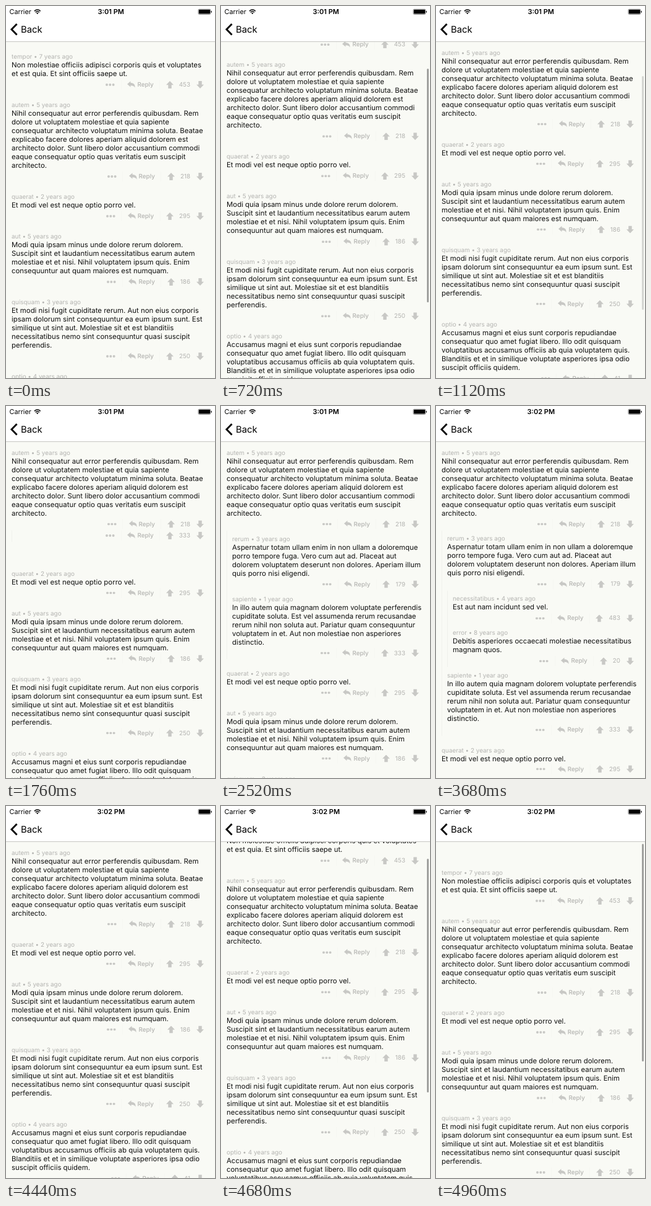
Write an HTML page that moves like this. It is 338 by 600 pixels and loops after 5000 ms.

```html
<!DOCTYPE html>
<html lang="la">
<head>
<meta charset="utf-8">
<title>Nested comments</title>
<style>
  html, body { margin: 0; width: 100%; height: 100%; overflow: hidden; background: #f9faf5; }
  body { position: relative; font: 11.42px/14px Inter, sans-serif; color: #111; text-rendering: geometricPrecision; }
  #list { position: absolute; top: 68px; left: 0; width: 338px; }
  #list > .node { padding-bottom: 9px; }
  .cell { position: relative; padding: 7px 0 0 9px; }
  .meta { height: 13px; font-size: 9.92px; color: #b4b4b1; }
  .text { white-space: pre; }
  .bar { height: 21px; margin-right: 18px; display: flex; align-items: center; justify-content: flex-end; font-size: 9.85px; color: #b4b4b1; }
  .bar svg { fill: #c8c8c5; }
  .bar b { font-weight: 500; margin-left: 3px; }
  .bar i { width: 1px; height: 16px; margin: 0 9.5px; background: #f5f6f1; }
  .bar span { margin: 0 10px 0 9px; }
  .kids { margin-left: 9px; overflow: hidden; }
  .inner { box-shadow: inset 1px 0 #f0f1ec; }
  #head { position: absolute; left: 0; top: 0; background: #fff; }
  #thumb { position: absolute; left: 333px; width: 2.5px; border-radius: 2px; background: #a0a09e; }
</style>
</head>
<body>
<div id="list"></div>
<div id="thumb"></div>
<svg id="head" width="338" height="58">
  <path d="M0 57.5H338" stroke="#c6c6c3"/>
  <text x="5.5" y="13" font-size="10.8">Carrier</text>
  <g fill="none" stroke="#000" stroke-width="1.5">
    <path d="M45.8 8.2Q50.8 3.8 55.8 8.2M47.7 10.1Q50.8 7.3 53.9 10.1"/>
    <path d="M17.6 29 9 37.8 17.6 46.6" stroke-width="2.9"/>
    <rect x="311" y="5.2" width="19.8" height="8.2" rx="1.6" stroke-width=".5"/>
  </g>
  <path d="M49.1 11.4Q50.8 10 52.5 11.4L50.8 13.2Z"/>
  <text id="clock" x="169.8" y="13" font-size="11" font-weight="600" text-anchor="middle"></text>
  <rect x="311.8" y="6" width="18.2" height="6.6" rx="1"/>
  <rect x="331.5" y="7.8" width="1.2" height="3" rx=".6"/>
  <text x="24" y="43.2" font-size="14.9">Back</text>
</svg>
<script>
const posts = [
  { who: 'tempor', years: 7, votes: 453, text: `Non molestiae officiis adipisci corporis quis et voluptates
et est quia. Et sint officiis saepe ut.` },
  { who: 'autem', years: 5, votes: 218, text: `Nihil consequatur aut error perferendis quibusdam. Rem
dolore ut voluptatem molestiae et quia sapiente
consequatur architecto voluptatum minima soluta. Beatae
explicabo facere dolores aperiam aliquid dolorem est
architecto dolor. Sunt libero dolor accusantium commodi
eaque consequatur optio quas veritatis eum suscipit
architecto.`, kids: [
    { who: 'rerum', years: 3, votes: 179, text: `Aspernatur totam ullam enim in non ullam a doloremque
porro tempore fuga. Vero cum aut ad. Placeat aut
dolorem voluptatem deserunt non dolores. Aperiam illum
quis porro nisi eligendi.`, kids: [
      { who: 'necessitatibus', years: 4, votes: 483, text: 'Est aut nam incidunt sed vel.' },
      { who: 'error', years: 8, votes: 20, text: `Debitis asperiores occaecati molestiae necessitatibus
magnam quos.` }] },
    { who: 'sapiente', years: 1, votes: 333, text: `In illo autem quia magnam dolorem voluptate perferendis
cupiditate soluta. Est vel assumenda rerum recusandae
rerum nihil non soluta aut. Pariatur quam consequuntur
voluptatem in et. Aut non molestiae non asperiores
distinctio.` }] },
  { who: 'quaerat', years: 2, votes: 295, text: 'Et modi vel est neque optio porro vel.' },
  { who: 'aut', years: 5, votes: 186, text: `Modi quia ipsam minus unde dolore rerum dolorem.
Suscipit sint et laudantium necessitatibus earum autem
molestiae et et nisi. Nihil voluptatem ipsum quis. Enim
consequuntur aut quam maiores est numquam.` },
  { who: 'quisquam', years: 3, votes: 250, text: `Et modi nisi fugit cupiditate rerum. Aut non eius corporis
ipsam dolorum sint consequuntur ea eum ipsum sunt. Est
similique ut sint aut. Molestiae sit et est blanditiis
necessitatibus nemo sint consequuntur quasi suscipit
perferendis.` },
  { who: 'optio', years: 4, votes: 41, text: `Accusamus magni et eius sunt corporis repudiandae
consequatur quo amet fugiat libero. Illo odit quisquam
voluptatibus accusamus officiis ab quia voluptatem quis.
Blanditiis et et in similique voluptate asperiores ipsa odio
suscipit officiis quidem.` }
];

const icon = (w, h, d) => `<svg width="${w}" height="${h}"><path d="${d}"/></svg>`;
const dot = x => `M${x} 2a2 2 0 1 0 4 0a2 2 0 1 0-4 0`;
const dots = icon(15, 4, dot(0) + dot(5.3) + dot(10.6));
const reply = icon(13, 11, 'M0 5 5.5.3V3C10 3 13 5 12.5 10.7 11 8 9 7.2 5.5 7.2V9.7Z');
const up = icon(12, 12, 'M6 0 12 6.3H8.7V12H3.3V6.3H0Z');
const down = icon(12, 12, 'M6 12 0 5.7H3.3V0H8.7V5.7H12Z');

const render = p => `<div class="node">
  <div class="cell">
    <div class="meta">${p.who} • ${p.years} year${p.years > 1 ? 's' : ''} ago</div>
    <div class="text">${p.text}</div>
    <div class="bar">${dots}<i></i>${reply}<b>Reply</b><i></i>${up}<span>${p.votes}</span>${down}</div>
  </div>
  ${p.kids ? `<div class="kids"><div class="inner">${p.kids.map(render).join('')}</div></div>` : ''}
</div>`;

const $ = id => document.getElementById(id);
const list = $('list'), thumb = $('thumb'), clock = $('clock');
list.innerHTML = posts.map(render).join('');
const [outer, nested] = document.querySelectorAll('.kids');

const clamp = x => Math.min(1, Math.max(0, x));
const ramp = (t, a, b) => clamp((t - a) / (b - a));
const smooth = (t, a, b) => { const x = ramp(t, a, b); return x * x * (3 - 2 * x); };
const cubic = x => x < .5 ? 4 * x ** 3 : 1 - 4 * (1 - x) ** 3;

// Replies slide out from beneath their parent.
function unfold(box, p) {
  const inner = box.firstChild, h = inner.offsetHeight;
  box.style.height = h * p + 'px';
  inner.style.transform = `translateY(${-1.18 * h * (1 - p)}px)`;
}

function frame() {
  const t = performance.now() % 5000;
  unfold(nested, smooth(t, 2662, 2982));
  unfold(outer, smooth(t, 1662, 1982) - smooth(t, 3680, 3980));

  const y = 84.5 * cubic(ramp(t, 400, 924)) - 110.5 * smooth(t, 4460, 4960);
  list.style.transform = `translateY(${-y}px)`;
  thumb.style.top = 61 + .62 * Math.max(0, y) + 'px';
  thumb.style.height = 377 + Math.min(0, y) + 'px';
  thumb.style.opacity = t < 3000 ? ramp(t, 400, 440) - ramp(t, 960, 1240) : ramp(t, 4460, 4500);
  clock.textContent = t < 3120 ? '3:01 PM' : '3:02 PM';
  requestAnimationFrame(frame);
}
frame();
</script>
</body>
</html>
```
